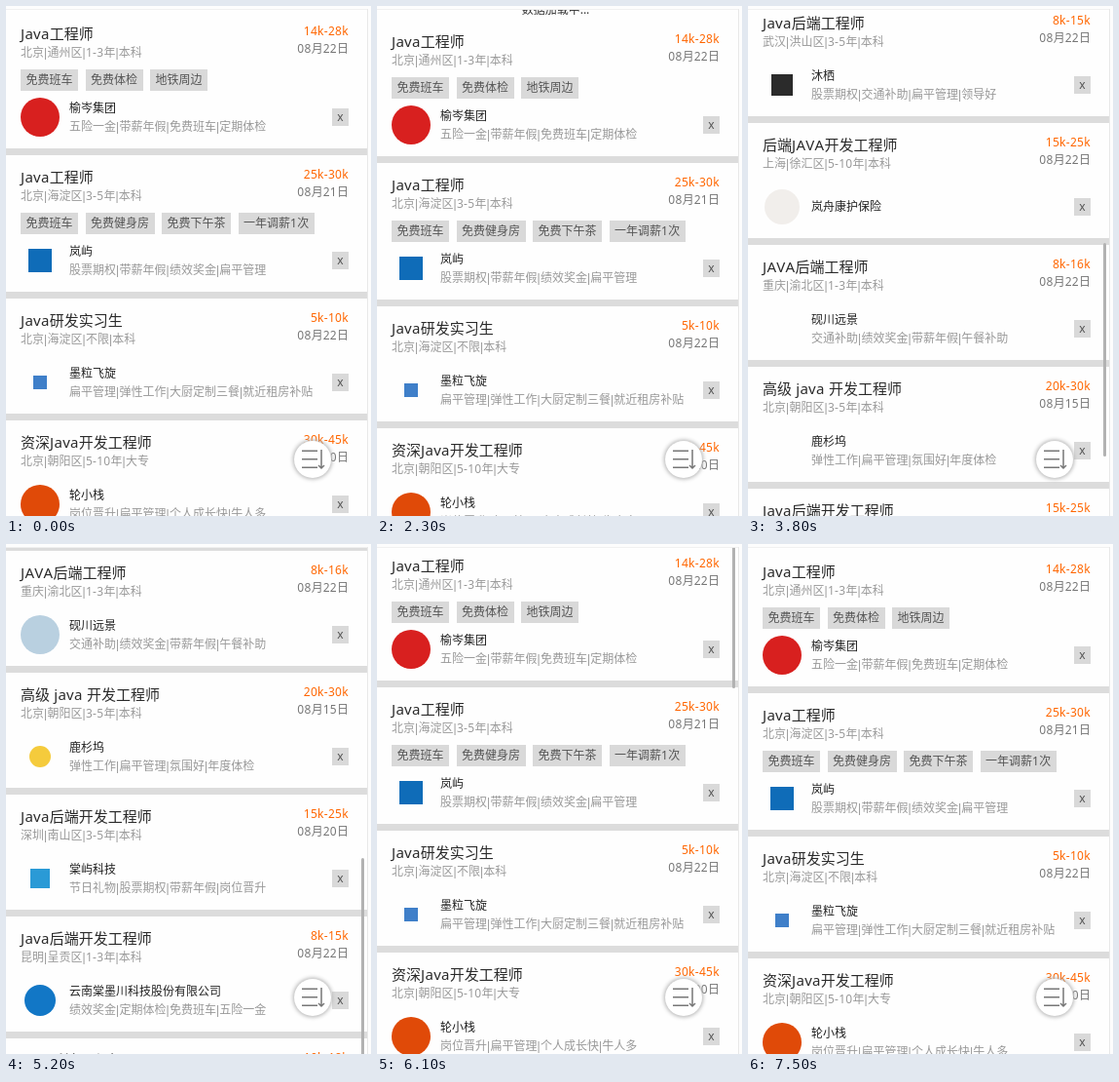
An HTML page that plays this animation: 375 px wide and 523 px high, repeating every 8100 ms.

```html
<!DOCTYPE html>
<html lang="zh-CN">
<head>
<meta charset="utf-8">
<title>职位列表</title>
<style>
html, body { margin: 0; width: 100%; height: 100%; overflow: hidden; background: #fdfdfd; }
body { position: relative; font: 12px 'Noto Sans', 'Noto Sans CJK SC', sans-serif; font-kerning: none; color: #999; white-space: nowrap; }
i { font-style: normal; letter-spacing: .3px; white-space: pre; }
i.bar { font-family: 'Liberation Sans', sans-serif; }
#view { position: absolute; left: 0; top: 3px; width: 371px; bottom: 0; overflow: hidden; background: #fefefe;
  border-right: 1px solid #e8e8e8; }
#view::before { content: ''; position: absolute; z-index: 1; left: 0; top: 0; width: 100%; height: 1px; background: #f0f0f0; }
#list { position: absolute; left: 0; top: -3px; width: 371px; will-change: transform; }
.card { position: absolute; left: 0; width: 371px; box-sizing: border-box; border-bottom: 7px solid #dcdcdc; }
.card > *, #loading { position: absolute; line-height: 20px; }
.title { left: 15px; top: 12px; font-size: 15px; color: #2a2a2a; }
.meta { left: 15px; top: 32px; }
.pay { right: 19px; top: 10px; color: #f60; }
.date { right: 19px; top: 28px; color: #777; }
.tags { left: 15px; top: 59px; display: flex; gap: 7.5px; }
.tags span { padding: 0 5.5px; line-height: 22px; background: #d9d9d9; color: #555; }
.firm { left: 65px; color: #222; }
.perks { left: 65px; }
.close { left: 335px; width: 17px; height: 18px; line-height: 18px !important; text-align: center; background: #d9d9d9; color: #555; }
#loading { left: 0; top: -14px; width: 367px; text-align: center; color: #333; }
#thumb { position: absolute; left: 365px; width: 3px; border-radius: 2px; background: #b2b2b2; }
#sort { position: absolute; left: 296px; top: 446px; width: 38px; height: 38px; border-radius: 50%;
  background: #fff; box-shadow: 0 0 4px 1px #b0b0b0; }
#sort svg { display: block; fill: none; stroke: #777; stroke-width: 1.5; }
</style>
</head>
<body>
<div id="view">
  <div id="list"><div id="loading">数据加载中...</div></div>
  <div id="thumb"></div>
</div>
<div id="sort"><svg width="38" height="38"><path d="M8 10.2H24M8 18.7H24M8 27.2H24M28 9V28M25 25L28 28L31 25"/></svg></div>
<script>
// title | place | pay | date | firm | perks | tags | logo: colour, size, round
const jobs = [
  ['Java工程师', '北京|通州区|1-3年|本科', '14k-28k', '08月22日', '榆岑集团', '五险一金|带薪年假|免费班车|定期体检', '免费班车 免费体检 地铁周边', '#d8201f', 40, 1],
  ['Java工程师', '北京|海淀区|3-5年|本科', '25k-30k', '08月21日', '岚屿', '股票期权|带薪年假|绩效奖金|扁平管理', '免费班车 免费健身房 免费下午茶 一年调薪1次', '#0f6cb8', 24, 0],
  ['Java研发实习生', '北京|海淀区|不限|本科', '5k-10k', '08月22日', '墨粒飞旋', '扁平管理|弹性工作|大厨定制三餐|就近租房补贴', '', '#3f7fc9', 14, 0],
  ['资深Java开发工程师', '北京|朝阳区|5-10年|大专', '30k-45k', '08月20日', '轮小栈', '岗位晋升|扁平管理|个人成长快|牛人多', '', '#e04a08', 40, 1],
  ['Java开发工程师', '北京|海淀区|3-5年|本科', '20k-40k', '07月31日', '柚川网络', '带薪年假|定期体检|弹性工作|节日礼物', '', '#3a3a3a', 36, 1],
  ['资深Java开发工程师', '北京|朝阳区|3-5年|本科', '20k-35k', '07月28日', '杉墨科技', '绩效奖金|股票期权|扁平管理|定期体检', '免费班车 弹性工作 免费体检 地铁周边', '#4a86c5', 36, 1],
  ['Java开发工程师', '北京|海淀区|1-3年|本科', '10k-20k', '08月22日', '禾汀软件', '带薪年假|绩效奖金|年度体检|五险一金', '', '#d9733a', 30, 0],
  ['Java后端工程师', '武汉|洪山区|3-5年|本科', '8k-15k', '08月22日', '沐栖', '股票期权|交通补助|扁平管理|领导好', '', '#2b2b2b', 22, 0],
  ['后端JAVA开发工程师', '上海|徐汇区|5-10年|本科', '15k-25k', '08月22日', '岚舟康护保险', '', '', '#f1eeeb', 36, 1],
  ['JAVA后端工程师', '重庆|渝北区|1-3年|本科', '8k-16k', '08月22日', '砚川远景', '交通补助|绩效奖金|带薪年假|午餐补助', '', '#b9d0e0', 40, 1],
  ['高级 java 开发工程师', '北京|朝阳区|3-5年|本科', '20k-30k', '08月15日', '鹿杉坞', '弹性工作|扁平管理|氛围好|年度体检', '', '#f5cb3c', 22, 1],
  ['Java后端开发工程师', '深圳|南山区|3-5年|本科', '15k-25k', '08月20日', '棠屿科技', '节日礼物|股票期权|带薪年假|岗位晋升', '', '#2a9ad6', 20, 0],
  ['Java后端开发工程师', '昆明|呈贡区|1-3年|本科', '8k-15k', '08月22日', '云南棠墨川科技股份有限公司', '绩效奖金|定期体检|免费班车|五险一金', '', '#1277c6', 32, 1],
  ['Java后端工程师', '成都|高新区|3-5年|本科', '10k-18k', '08月22日', '汀禾软件', '带薪年假|节日礼物|定期体检|五险一金', '', '#5b8f6a', 32, 1]
];
const EAGER = 9;      // logos loaded from the start
const LOAD_AT = 4400; // the rest appear here
const LOOP = 8100, STEP = 100;

// [ms, scroll position]; negative is pulled down
const track = [
  [0, 0], [600, 0], [700, -15], [1000, -84], [1100, -84], [1300, -48],
  [2100, -48], [2200, -26], [2300, -8], [2400, 0],
  [3100, 0], [3200, 62], [3500, 514], [3900, 1098], [4000, 1223],
  [5100, 1223], [5200, 1190], [6100, 6], [6300, -88], [6400, -80], [6500, -60], [6600, -48],
  [7200, -48], [7300, -26], [7400, -8], [7500, 0], [LOOP, 0]
];
const fade = [
  [0, 0], [3100, 0], [3200, 1], [4300, 1], [4400, .4], [4500, 0],
  [5100, 0], [5200, 1], [6400, 1], [6500, .4], [6600, 0], [LOOP, 0]
];

const $ = id => document.getElementById(id);
const list = $('list'), loading = $('loading'), thumb = $('thumb');
const latin = s => s.replace(/\||[ -{}~]+/g, m => `<i${m === '|' ? ' class="bar"' : ''}>${m}</i>`);
const lateLogos = [];

function add(parent, cls, text, top) {
  const el = document.createElement('div');
  el.className = cls;
  el.innerHTML = latin(text);
  if (top !== undefined) el.style.top = top + 'px';
  return parent.appendChild(el);
}

let y = 6;
jobs.forEach(([title, place, pay, date, firm, perks, tags, color, size, round], n) => {
  const card = add(list, 'card', '', y);
  const mid = tags ? 108 : 86;
  const height = mid + 39;
  card.style.height = height + 'px';
  add(card, 'title', title);
  add(card, 'meta', place);
  add(card, 'pay', pay);
  add(card, 'date', date);
  if (tags) {
    add(card, 'tags', '').innerHTML = tags.split(' ').map(t => `<span>${latin(t)}</span>`).join('');
  }
  add(card, 'firm', firm, mid - (perks ? 19 : 10));
  if (perks) add(card, 'perks', perks, mid);
  add(card, 'close', 'x', mid - 9);
  const logo = add(card, 'logo', '', mid - size / 2);
  Object.assign(logo.style, {
    left: 35 - size / 2 + 'px', width: size + 'px', height: size + 'px',
    background: color, borderRadius: round ? '50%' : 0
  });
  if (n >= EAGER) lateLogos.push(logo);
  y += height;
});

function at(keys, t) {
  const k = keys.findIndex(p => p[0] > t);
  const [t0, a] = keys[k - 1], [t1, b] = keys[k];
  return a + (b - a) * (t - t0) / (t1 - t0);
}

function draw(now) {
  const t = Math.floor(now % LOOP / STEP) * STEP;
  const pos = Math.round(at(track, t));
  list.style.transform = `translateY(${-pos}px)`;
  const busy = t >= 1200 && t < 2400 || t >= 6500 && t < 7500;
  loading.style.visibility = busy ? 'visible' : 'hidden';
  for (const logo of lateLogos) logo.style.visibility = t >= LOAD_AT ? 'visible' : 'hidden';

  const shift = pos * .332;
  thumb.style.top = Math.max(shift, 0) - 76 + 'px';
  thumb.style.height = 219 + Math.min(shift, 0) * 3 + 'px';
  thumb.style.opacity = at(fade, t);
}

const start = performance.now();
function tick() {
  draw(performance.now() - start);
  requestAnimationFrame(tick);
}
tick();
</script>
</body>
</html>
```
